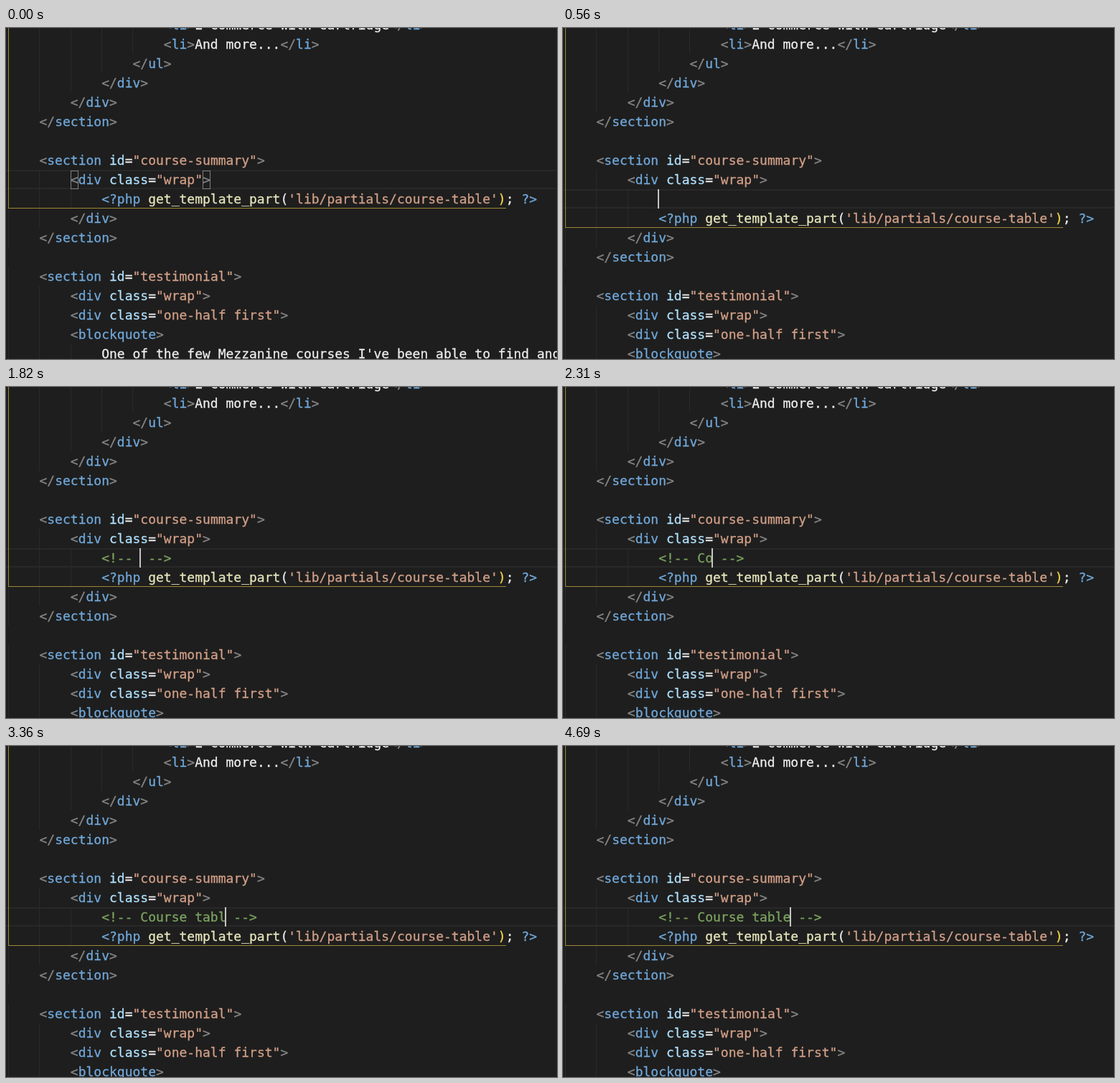
An HTML page for the animation above (4.76 s loop, 768x462 px).

```html
<!DOCTYPE html>
<html lang="en">
<head>
<meta charset="utf-8">
<title>Adding a comment in a code editor</title>
<style>
html, body { margin: 0; width: 100%; height: 100%; overflow: hidden; background: #1e1e1e; }
#stage { position: relative; width: 768px; height: 462px; overflow: hidden; background: #1e1e1e; }
#stage div { position: absolute; box-sizing: border-box; }
.row { height: 27px; font: 18px/27px "DejaVu Sans Mono", monospace; white-space: pre; color: #eeeeee; -webkit-text-stroke: 0.3px; }
.punct { color: #868686; }
.word { color: #70a8da; }
.attr { color: #b0e0fc; }
.string { color: #d29f87; }
.func { color: #e6e6bc; }
.gold { color: #f9d849; }
.comment { color: #7ba35f; }
.guide { width: 1px; background: #2a2a2a; }
#current { left: 0; width: 768px; height: 27px; border: solid #282828; border-width: 2px 0; }
#pair { left: 3px; width: 694px; border: solid #9c8736; border-width: 0 0 1px 1px; }
#stale { left: 3px; top: 0; width: 1px; height: 225px; background: #5c5c5c; }
.match { top: 199px; width: 11px; height: 26px; border: 1px solid #808080; }
#caret { width: 2px; height: 27px; background: #c4c5c3; }
</style>
</head>
<body>
<div id="stage"></div>
<script>
const LOOP = 4760, BLINK = 490;
const LEFT = 3.1, CHAR = 10.836, LINE = 27, TOP = -18, NEW_ROW = 9;

const before = [
  [20, '<li>E-commerce with Cartridge</li>'],
  [20, '<li>And more...</li>'],
  [16, '</ul>'],
  [12, '</div>'],
  [8, '</div>'],
  [4, '</section>'],
  [0, ''],
  [4, '<section id="course-summary">'],
  [8, '<div class="wrap">'],
];
const after = [
  [12, "<?php get_template_part('lib/partials/course-table'); ?>"],
  [8, '</div>'],
  [4, '</section>'],
  [0, ''],
  [4, '<section id="testimonial">'],
  [8, '<div class="wrap">'],
  [8, '<div class="one-half first">'],
  [8, '<blockquote>'],
  [12, "One of the few Mezzanine courses I've been able to find and"],
];

// Time, comment text (null before the new line exists); the caret blinks from each step.
const steps = [[0, null], [280, ''], [1540, '<!--  -->']];
'Course table'.split('').forEach((_, i, letters) => {
  const time = i === 11 ? 3490 : 2100 + Math.round(i * 1.78) * 70;
  steps.push([time, `<!-- ${letters.slice(0, i + 1).join('')} -->`]);
});

const stage = document.getElementById('stage');
const px = col => LEFT + col * CHAR;

function add(parent, className, style = {}) {
  const node = document.createElement('div');
  node.className = className;
  for (const key in style) {
    node.style[key] = typeof style[key] === 'number' ? style[key] + 'px' : style[key];
  }
  return parent.appendChild(node);
}

const TOKEN = new RegExp([
  '(?<comment><!--.*-->)',
  '(?<word><\\?php|\\?>|(?<=<\\/?)\\w+)',
  '(?<punct><\\/?|>)',
  '(?<string>"[^"]*"|\'[^\']*\')',
  '(?<attr>\\w+(?==))',
  '(?<func>\\w+(?=\\())',
  '(?<gold>\\))',
].join('|'), 'g');

function colour(node, text) {
  node.textContent = '';
  let end = 0;
  for (const found of text.matchAll(TOKEN)) {
    const span = document.createElement('span');
    span.className = Object.keys(found.groups).find(name => found.groups[name]);
    span.textContent = found[0];
    node.append(text.slice(end, found.index), span);
    end = found.index + found[0].length;
  }
  node.append(text.slice(end));
}

function addRows(parent, rows, first) {
  rows.forEach(([indent, text], i) => {
    const top = TOP + (first + i) * LINE;
    for (let col = 0; col < indent; col += 4) {
      add(parent, 'guide', { left: Math.round(px(col)), top, height: LINE });
    }
    colour(add(parent, 'row', { left: px(indent), top }), text);
  });
}

function addNamed(id) {
  const node = add(stage, '');
  node.id = id;
  return node;
}

const current = addNamed('current');
addRows(stage, before, 0);
const lower = add(stage, '', { left: 0, top: 0, width: 768, height: 500 });
addRows(lower, after, NEW_ROW);
const innerGuides = [0, 4, 8].map(col =>
  add(stage, 'guide', { left: Math.round(px(col)), top: 225, height: LINE }));
const pair = addNamed('pair');
const stale = addNamed('stale');
const matches = [8, 25].map(col => add(stage, 'match', { left: Math.round(px(col)) }));
const comment = add(stage, 'row', { left: px(12), top: 225 });
const caret = addNamed('caret');
caret.style.top = '225px';

function show(node, on) {
  node.style.visibility = on ? 'visible' : 'hidden';
}

let shown;
function draw(time) {
  const [start, text] = steps.filter(step => step[0] <= time).pop();
  const inserted = text !== null;
  const settling = inserted && time < 350;

  if (shown !== text) {
    colour(comment, text || '');
    shown = text;
  }
  lower.style.top = (inserted ? LINE : 0) + 'px';
  current.style.top = (inserted ? 225 : 198) + 'px';
  pair.style.top = (settling ? 252 : 0) + 'px';
  pair.style.height = (settling ? 27 : inserted ? 279 : 252) + 'px';
  show(stale, settling);
  matches.forEach(node => show(node, time < 350));
  innerGuides.forEach(node => show(node, inserted && !settling));

  const typed = text ? text.length - 4 : 0;
  caret.style.left = Math.floor(px(12 + typed) - 1) + 'px';
  show(caret, inserted && Math.floor((time - start) / BLINK) % 2 === 0);
}

const origin = performance.now();
function tick() {
  draw((performance.now() - origin) % LOOP);
  requestAnimationFrame(tick);
}
tick();
</script>
</body>
</html>
```
